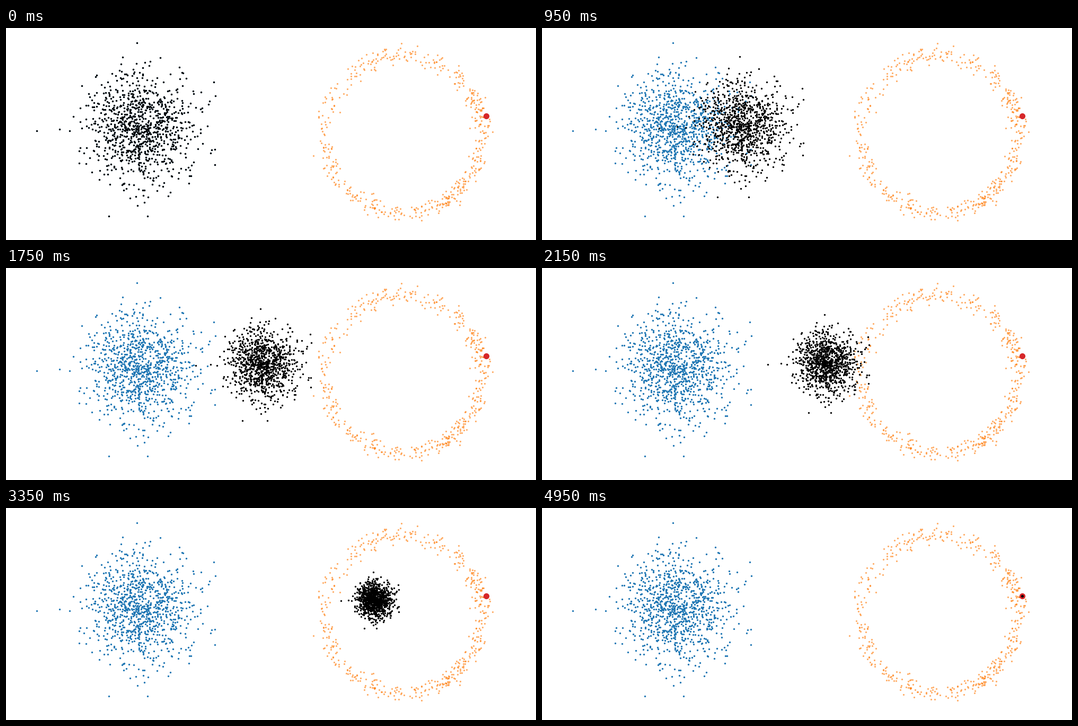
These frames come from a looping animation (1000x400 px, 5000 ms). A matplotlib script:

```python
import numpy as np
import matplotlib.pyplot as plt
from matplotlib.animation import FuncAnimation

WIDTH, HEIGHT, DPI = 1000, 400, 100
FRAMES, INTERVAL = 100, 50
CLOUD_SIZE, RING_SIZE = 1000, 500
TARGET = np.array([906, 166])

# The farthest samples, which set the outline of the cloud.
EXTREMES = [(58, 194), (101, 191), (247, 28), (392, 102),
            (395, 128), (394, 258), (267, 355), (194, 355)]


def make_cloud(rng):
    """Gaussian blob without far tails, plus the extreme samples."""
    center, sigma, reach = np.array([253, 194]), 50, 148
    points = rng.normal(center, sigma, (2 * CLOUD_SIZE, 2))
    near = np.hypot(*(points - center).T) < reach
    return np.vstack([EXTREMES, points[near][:CLOUD_SIZE - len(EXTREMES)]])


def make_ring(rng):
    """Noisy circle, thinnest at the upper left."""
    angle = rng.uniform(0, 2 * np.pi, 3 * RING_SIZE)
    density = 1 - 0.35 * np.cos(angle - np.radians(130))
    angle = angle[rng.uniform(0, 1.35, len(angle)) < density][:RING_SIZE]
    radius = rng.normal(150, 9, len(angle))
    return np.column_stack([749 + radius * np.cos(angle),
                            200 - radius * np.sin(angle)])


rng = np.random.default_rng(7)
cloud = make_cloud(rng)
ring = make_ring(rng)

fig = plt.figure(figsize=(WIDTH / DPI, HEIGHT / DPI), dpi=DPI, facecolor="white")
ax = fig.add_axes([0, 0, 1, 1])
ax.set_xlim(0, WIDTH)
ax.set_ylim(HEIGHT, 0)
ax.axis("off")

ax.scatter(*cloud.T, s=2, color="tab:blue", zorder=1)
ax.scatter(*ring.T, s=2, color="tab:orange", alpha=0.5, zorder=2)
ax.scatter(*TARGET, s=50, color="tab:red", zorder=3)
movers = ax.scatter(*cloud.T, s=2, color="black", zorder=4)


def update(frame):
    t = frame / (FRAMES - 1)
    movers.set_offsets((1 - t) * cloud + t * TARGET)
    return movers,


anim = FuncAnimation(fig, update, frames=FRAMES, interval=INTERVAL,
                     repeat=True, repeat_delay=0)
plt.show()
```
